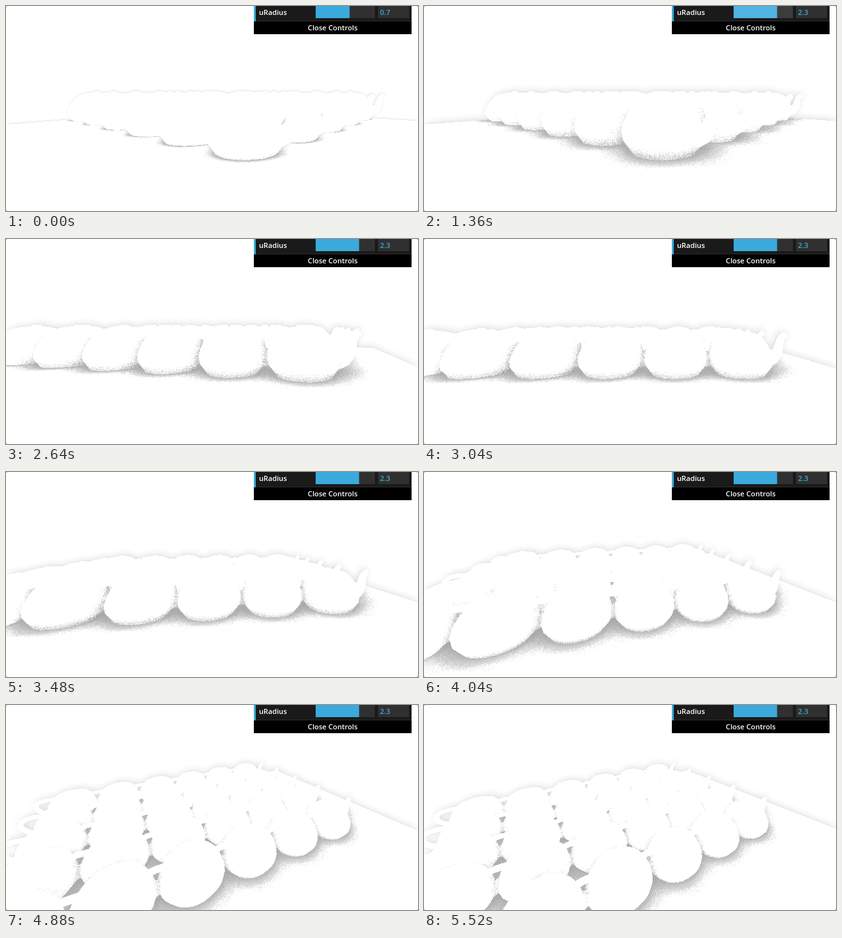
Animation, 640 px wide and 320 px high, one loop 6.24 s. Source, as an HTML page with a canvas:

```html
<!DOCTYPE html>
<html lang="en">
<head>
<meta charset="utf-8">
<title>Ambient occlusion</title>
<style>
  html, body { margin: 0; width: 100%; height: 100%; overflow: hidden; background: #fff; }
  canvas { display: block; width: 640px; height: 320px; }
</style>
</head>
<body>
<canvas id="stage" width="640" height="320"></canvas>
<script>
const W = 640, H = 320, LOOP = 6240, STEP = 40;
const FOCAL = 350, CX = 400, CY = 20, BACKDROP = 12;
const COLUMNS = 6, ROWS = 5, POT_SCALE = 0.247;
const FLOOR_K = 1.82, FLOOR_J = 0.9, FLOOR_HALF = 3.57;
const BACK = 0, FLOOR = 1, POT = 2;
const ctx = document.getElementById('stage').getContext('2d');

// Teapot mesh: x points along the spout, y up
const verts = [], quads = [];

function addSurface(rows, cols, point) {
  const base = verts.length;
  for (let i = 0; i <= rows; i++)
    for (let j = 0; j < cols; j++) verts.push(point(i, j / cols * Math.PI * 2).map(n => n * POT_SCALE));
  for (let i = 0; i < rows; i++)
    for (let j = 0; j < cols; j++) {
      const p = base + i * cols, k = (j + 1) % cols;
      quads.push([p + j, p + k, p + cols + k, p + cols + j]);
    }
}

function bezier(p, t) {
  const s = 1 - t;
  return [0, 1].map(n => s * s * s * p[0][n] + 3 * s * s * t * p[1][n] + 3 * s * t * t * p[2][n] + t * t * t * p[3][n]);
}

function addTube(path, radius) {
  const rows = 9;
  addSurface(rows, 8, (i, angle) => {
    const t = i / rows, c = bezier(path, t);
    const a = bezier(path, t - 0.01), b = bezier(path, t + 0.01);
    const dx = b[0] - a[0], dy = b[1] - a[1], len = Math.hypot(dx, dy);
    const r = radius(t), n = r * Math.cos(angle);
    return [c[0] - dy / len * n, c[1] + dx / len * n, r * Math.sin(angle)];
  });
}

const profile = [[0, 0], [1.45, 0.02], [1.6, 0.2], [1.9, 0.55], [2, 0.9], [1.95, 1.3], [1.8, 1.7], [1.55, 2.1],
  [1.35, 2.3], [1.1, 2.4], [0.75, 2.5], [0.25, 2.56], [0.3, 2.62], [0, 2.66]];
addSurface(profile.length - 1, 28, (i, a) => [profile[i][0] * Math.cos(a), profile[i][1], profile[i][0] * Math.sin(a)]);
addTube([[-1.5, 2], [-3.4, 2.2], [-3, 1], [-1.85, 0.6]], () => 0.2);
addTube([[1.4, 0.8], [2.9, 0.8], [2.3, 2], [3.1, 2.3]], t => 0.55 - 0.35 * Math.sqrt(t));

// Camera path: time, azimuth, pitch, offset of the corner pot (sideways, ahead), eye height
const path = [
  [2080, -37.3, -17.9, -0.19, 2.9, 0.655],
  [2280, -27.7, -17.6, 0.12, 2.9, 0.65],
  [3040, 0, -17.6, 0.91, 3.87, 0.75],
  [4040, 18, -7.2, 1.29, 4.58, 1.77],
  [4880, 32, 3.3, 1.44, 4.95, 2.86],
  [5200, 36.4, 3.8, 1.48, 5.03, 2.95]
];

function cameraAt(time) {
  const last = path.length - 1;
  let i = 0;
  while (i < last - 1 && time > path[i + 1][0]) i++;
  const a = path[i], b = path[i + 1], span = b[0] - a[0], t = (time - a[0]) / span;
  const slope = (k, n) => k === 0 || k === last ? 0
    : (path[k + 1][n] - path[k - 1][n]) / (path[k + 1][0] - path[k - 1][0]);
  const [azimuth, pitch, side, ahead, eye] = [1, 2, 3, 4, 5].map(n =>
    a[n] + (b[n] - a[n]) * t * t * (3 - 2 * t)
    + span * t * (1 - t) * (slope(i, n) * (1 - t) - slope(i + 1, n) * t));
  const az = azimuth * Math.PI / 180, p = pitch * Math.PI / 180;
  return { cosA: Math.cos(az), sinA: Math.sin(az), cosP: Math.cos(p), sinP: Math.sin(p), side, ahead, eye };
}

const depth = new Float32Array(W * H);
const kind = new Uint8Array(W * H);

// The depth buffer holds 1/z while triangles are drawn
function fillTriangle(a, b, c) {
  const [ax, ay, aw] = a, [bx, by, bw] = b, [cx, cy, cw] = c;
  const area = (bx - ax) * (cy - ay) - (by - ay) * (cx - ax);
  if (Math.abs(area) < 1e-6) return;
  const x0 = Math.max(0, Math.floor(Math.min(ax, bx, cx))), x1 = Math.min(W - 1, Math.ceil(Math.max(ax, bx, cx)));
  const y0 = Math.max(0, Math.floor(Math.min(ay, by, cy))), y1 = Math.min(H - 1, Math.ceil(Math.max(ay, by, cy)));
  const sign = area > 0 ? 1 : -1;
  const gx = ((bw - aw) * (cy - ay) - (cw - aw) * (by - ay)) / area;
  const gy = ((cw - aw) * (bx - ax) - (bw - aw) * (cx - ax)) / area;
  for (let y = y0; y <= y1; y++)
    for (let x = x0; x <= x1; x++) {
      const px = x + 0.5, py = y + 0.5;
      if (((bx - ax) * (py - ay) - (by - ay) * (px - ax)) * sign < 0) continue;
      if (((cx - bx) * (py - by) - (cy - by) * (px - bx)) * sign < 0) continue;
      if (((ax - cx) * (py - cy) - (ay - cy) * (px - cx)) * sign < 0) continue;
      const w = aw + gx * (px - ax) + gy * (py - ay), i = y * W + x;
      if (w > depth[i]) { depth[i] = w; kind[i] = POT; }
    }
}

function drawDepth({ cosA, sinA, cosP, sinP, side, ahead, eye }) {
  for (let y = 0, i = 0; y < H; y++) {
    const up = (CY - y - 0.5) / FOCAL, dirY = up * cosP - sinP, dirZ = cosP + up * sinP;
    for (let x = 0; x < W; x++, i++) {
      depth[i] = 1 / BACKDROP;
      kind[i] = BACK;
      if (dirY >= 0) continue;
      const t = -eye / dirY;
      const X = t * (x + 0.5 - CX) / FOCAL - side, Z = t * dirZ - ahead;
      const k = -X * cosA - Z * sinA, j = Z * cosA - X * sinA;
      if (Math.abs(k - FLOOR_K) < FLOOR_HALF && Math.abs(j - FLOOR_J) < FLOOR_HALF) {
        depth[i] = 1 / t;
        kind[i] = FLOOR;
      }
    }
  }
  let top = H;
  for (let k = 0; k < COLUMNS; k++)
    for (let j = 0; j < ROWS; j++) {
      const points = verts.map(p => {
        const a = k - p[0], b = j + p[2], h = p[1] - eye;
        const X = side - a * cosA - b * sinA, Z = ahead - a * sinA + b * cosA;
        const w = 1 / (Z * cosP - h * sinP);
        const y = CY - (h * cosP + Z * sinP) * FOCAL * w;
        if (y < top) top = y;
        return [CX + X * FOCAL * w, y, w];
      });
      for (const [a, b, c, d] of quads) {
        fillTriangle(points[a], points[b], points[c]);
        fillTriangle(points[a], points[c], points[d]);
      }
    }
  for (let i = 0; i < depth.length; i++) depth[i] = 1 / depth[i];
  return top;
}

// Opposite pairs of sample points inside a unit ball
const samples = [];
for (let i = 0; i < 8; i++) {
  const z = 1 - (i + 0.5) / 8, r = 0.15 + 0.85 * ((i * 0.618 + 0.3) % 1), flat = Math.sqrt(1 - z * z);
  const p = [flat * Math.cos(i * 2.4) * r, flat * Math.sin(i * 2.4) * r, z * r];
  samples.push(p, p.map(n => -n));
}
const COUNT = samples.length;

const turns = new Float32Array(W * H);
let seed = 7;
for (let i = 0; i < turns.length; i++) {
  seed = (Math.imul(seed, 1664525) + 1013904223) >>> 0;
  turns[i] = seed / 4294967296 * Math.PI * 2;
}

function occlusion(x, y, R, { cosP, sinP }) {
  const i = y * W + x, z = depth[i], type = kind[i], bias = 0.012 * z;
  const c = Math.cos(turns[i]), s = Math.sin(turns[i]);
  let sum = 0;
  for (let n = 0; n < COUNT; n++) {
    const p = samples[n];
    const dx = p[0] * c - p[1] * s;
    let dy = p[0] * s + p[1] * c, dz = p[2];
    if (type === FLOOR) {
      const height = dy * cosP - dz * sinP;
      if (height < 0) { dy -= 2 * height * cosP; dz += 2 * height * sinP; }
    } else if (type === BACK && dz > 0) dz = -dz;
    const zs = z + dz * R, q = z / zs, k = R * FOCAL / zs;
    const px = Math.floor(CX + (x + 0.5 - CX) * q + dx * k);
    const py = Math.floor(CY + (y + 0.5 - CY) * q - dy * k);
    if (px < 0 || py < 0 || px >= W || py >= H) continue;
    const j = py * W + px;
    if (type === BACK) {
      if (kind[j] !== BACK) sum++;
    } else if (zs - depth[j] > bias) {
      const gap = z - depth[j];
      sum += gap > R ? R / gap : 1;
    }
  }
  const share = sum / COUNT;
  if (type === BACK) return share * 0.16;
  if (type === POT) return Math.max(0, share - 0.55) * 1.2;
  return 0.37 * (1 - Math.exp(-3 * Math.max(0, share - 0.12)));
}

function renderScene(state) {
  const view = cameraAt(state.camera), R = state.radius * 0.2;
  const top = drawDepth(view) - R * FOCAL / BACKDROP - 2;
  const image = ctx.createImageData(W, H), data = image.data;
  data.fill(255);
  for (let y = Math.max(0, Math.floor(top)); y < H; y++)
    for (let x = 0; x < W; x++) {
      const i = (y * W + x) * 4;
      data[i] = data[i + 1] = data[i + 2] = 255 * (1 - occlusion(x, y, R, view));
    }
  return image;
}

function radiusAt(t) {
  if (t < 760) return 0.7;
  if (t < 920) return 1.9;
  const step = Math.min(8, Math.floor((t - 920) / 60) + 1);
  return 1.9 + 0.05 * step;
}

function stateAt(t) {
  const radius = radiusAt(t);
  const camera = Math.min(5200, Math.max(2080, Math.floor(t / STEP) * STEP));
  return { radius, camera, key: radius.toFixed(2) + '/' + camera };
}

const cache = new Map();
function sceneFor(state) {
  if (!cache.has(state.key)) cache.set(state.key, renderScene(state));
  return cache.get(state.key);
}

// Renders one upcoming picture ahead of its time
function prepareNext(t) {
  for (let d = STEP; d < LOOP; d += STEP) {
    const state = stateAt((t + d) % LOOP);
    if (!cache.has(state.key)) return sceneFor(state);
  }
}

function box(color, x, y, w, h) {
  ctx.fillStyle = color;
  ctx.fillRect(x, y, w, h);
}

function label(text, x, y, color, align) {
  ctx.fillStyle = color;
  ctx.textAlign = align;
  ctx.fillText(text, x, y);
}

function drawPanel(t, radius) {
  const closeHover = t >= 200 && t < 600, sliderHover = t >= 600 && t < 1920;
  ctx.font = '600 11.2px "Open Sans", sans-serif';
  box('#1a1a1a', 385, 0, 245, 23);
  box('#2c2c2c', 385, 23, 245, 1);
  box('#3aaadc', 385, 0, 3, 24);
  box(sliderHover ? '#3c3c3c' : '#303030', 481, 0, 92, 19);
  box(sliderHover ? '#50b4e0' : '#3aaadc', 481, 0, 92.5 * (radius + 5) / 10, 19);
  box('#303030', 578, 0, 48, 19);
  box(closeHover ? '#111' : '#000', 385, 24, 245, 20);
  label('uRadius', 393, 14, '#fff', 'left');
  label(radius.toFixed(1), 581, 14, '#3aaadc', 'left');
  label('Close Controls', 507.5, 38, '#fff', 'center');
}

function drawCorners() {
  for (const x of [0, W - 1])
    for (const y of [0, H - 1]) {
      box('#aaa', x, y, 1, 1);
      box('#ddd', x ? x - 1 : 1, y, 1, 1);
      box('#ddd', x, y ? y - 1 : 1, 1, 1);
    }
}

function frame() {
  const t = performance.now() % LOOP, state = stateAt(t);
  const ready = cache.has(state.key);
  ctx.putImageData(sceneFor(state), 0, 0);
  drawPanel(t, state.radius);
  drawCorners();
  if (ready) prepareNext(t);
  requestAnimationFrame(frame);
}
frame();
</script>
</body>
</html>
```
